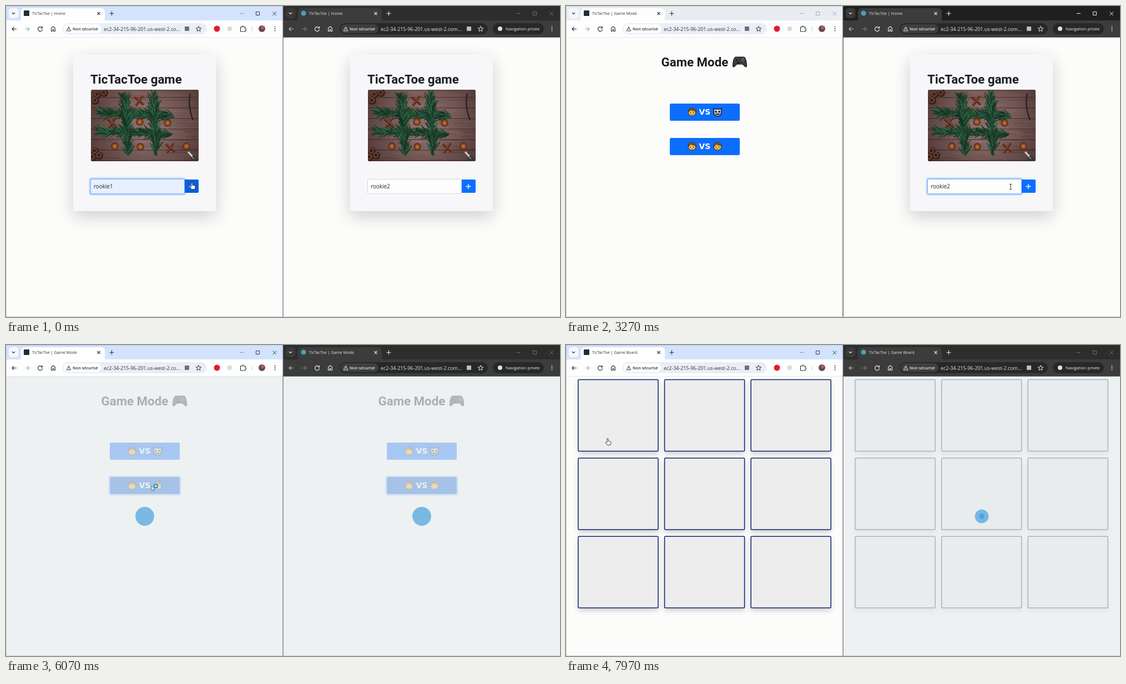
These frames come from a looping animation (998 px wide and 561 px high, 8 s). An HTML page with a canvas:

```html
<!DOCTYPE html>
<html lang="fr">
<head>
<meta charset="utf-8">
<title>TicTacToe</title>
<style>
html, body { margin: 0; width: 100%; height: 100%; overflow: hidden; background: #fcfcfb; }
canvas { display: block; width: 998px; height: 561px; }
</style>
</head>
<body>
<canvas id="stage" width="998" height="561"></canvas>
<script>
const LOOP = 8000, HALF = 499;
const UI = '"Open Sans", "Noto Sans", sans-serif';
const HEADING = 'bold 22.3px Roboto, sans-serif';
const BLUE = '#0d6efd', DARK_BLUE = '#0b5ed7';
let c = document.getElementById('stage').getContext('2d');
const screenContext = c;

// Times of the clicks and page changes
const LEFT = { click: 200, mode: 450, hover: 5740, load: 6045, board: 7310, loadEnd: 7310 };
const RIGHT = { hoverAdd: 3460, click: 3600, mode: 4250, hover: 4680, load: 5005, board: 7310, loadEnd: LOOP };
const FOCUS_RIGHT = 1500, FOCUS_LEFT = 5950;

// ---------- drawing helpers ----------
function box(x, y, w, h, r, fill, stroke, lineWidth = 1) {
  c.beginPath();
  c.roundRect(x, y, w, h, r);
  if (fill) { c.fillStyle = fill; c.fill(); }
  if (stroke) { c.strokeStyle = stroke; c.lineWidth = lineWidth; c.stroke(); }
}
function disc(x, y, r, fill, stroke, lineWidth = 1) {
  c.beginPath();
  c.arc(x, y, r, 0, 7);
  if (fill) { c.fillStyle = fill; c.fill(); }
  if (stroke) { c.strokeStyle = stroke; c.lineWidth = lineWidth; c.stroke(); }
}
function path(d, stroke, lineWidth = 1, fill) {
  const p = new Path2D(d);
  if (fill) { c.fillStyle = fill; c.fill(p); }
  if (stroke) { c.strokeStyle = stroke; c.lineWidth = lineWidth; c.stroke(p); }
}
function text(s, x, y, font, color) {
  c.font = font;
  c.fillStyle = color;
  c.fillText(s, x, y);
}
function at(x, y, draw) {
  c.save();
  c.translate(x, y);
  draw();
  c.restore();
}
function withShadow(color, blur, dy, draw) {
  c.save();
  c.shadowColor = color;
  c.shadowBlur = blur;
  c.shadowOffsetY = dy;
  draw();
  c.restore();
}
function seeded(seed) {
  return () => (seed = seed * 16807 % 2147483647) / 2147483647;
}

// ---------- picture on the home card ----------
function makePhoto() {
  const canvas = document.createElement('canvas');
  canvas.width = 194;
  canvas.height = 129;
  c = canvas.getContext('2d');
  const rnd = seeded(77);
  c.fillStyle = '#876a66';
  c.fillRect(0, 0, 194, 129);
  for (let i = 0; i < 160; i++) {
    const x = rnd() * 194 - 20, y = rnd() * 129;
    path(`M${x} ${y}h${15 + rnd() * 40}`, i % 2 ? '#a98a8455' : '#57393555', 1);
  }
  for (let y = 14; y < 129; y += 19) path(`M0 ${y}H194`, '#4b3230', 1);
  const vignette = c.createRadialGradient(100, 60, 30, 100, 60, 120);
  vignette.addColorStop(0, 'rgba(40,18,18,0)');
  vignette.addColorStop(1, 'rgba(40,18,18,.6)');
  c.fillStyle = vignette;
  c.fillRect(0, 0, 194, 129);

  // A bushy branch: needles fan forward from a spine
  function branch(x0, y0, x1, y1) {
    const angle = Math.atan2(y1 - y0, x1 - x0);
    const greens = ['#15301f', '#1f4a30', '#33694a', '#193a27'];
    for (let i = 0; i < 420; i++) {
      const k = rnd(), a = angle + (rnd() - .5) * 1.5, len = 8 + rnd() * 11;
      const x = x0 + (x1 - x0) * k + (rnd() - .5) * 6, y = y0 + (y1 - y0) * k + (rnd() - .5) * 6;
      path(`M${x} ${y}l${Math.cos(a) * len} ${Math.sin(a) * len}`, greens[i % 4], 1.2);
    }
  }
  branch(150, 47, 22, 42);
  branch(146, 80, 20, 75);
  branch(67, 118, 62, 18);
  branch(117, 118, 113, 14);
  for (const [x, y] of [[88, 58], [138, 60], [43, 102], [89, 103], [172, 102]]) {
    disc(x, y, 6, '#8c4a25', '#52291b', 1.5);
    disc(x, y, 2.8, '#b06a38');
  }
  for (const [x, y] of [[87, 20], [38, 60], [143, 105]]) {
    path(`M${x - 8} ${y - 7}l16 14M${x + 6} ${y - 9}l-12 18`, '#431f15', 4);
    path(`M${x - 8} ${y - 8}l16 14M${x + 6} ${y - 10}l-12 18`, '#944a2c', 1.5);
  }
  for (const [x, y] of [[12, 9], [24, 6], [8, 20], [7, 111], [15, 119], [3, 122]]) {
    disc(x, y, 7, '#3a211b');
    disc(x - 1, y - 1, 4, null, '#84533c', 1.5);
  }
  path('M179 7Q174 30 184 55', '#2a2323', 2.5);
  path('M175 112l11 12', '#d0d3d6', 3);
  path('M183 120l9 6M180 123l8 6', '#35353a', 3);
  c = screenContext;
  return canvas;
}
const photo = makePhoto();

// ---------- emoji ----------
function face(x, y) {
  at(x, y, () => {
    disc(0, .5, 6.8, '#fcc353', '#33230f', 1);
    path('M-7 1C-8-9 8-10 7 1L5-2Q0-1-2-4Q-4-1-7 1Z', '#33230f', .8, '#8a5523');
    disc(-2.6, 1.5, .9, '#332211');
    disc(2.6, 1.5, .9, '#332211');
    path('M-2 4.5Q0 5.5 2 4.5', '#6b3d13', .8);
  });
}
function robot(x, y) {
  at(x, y, () => {
    path('M-7-6l3 1h8l3-1l0 8Q5 8 0 8Q-5 8-7 2Z', '#1c1f24', 1.5, '#b9bfc4');
    box(-4.5, -4, 9, 3.5, 1, '#f1f3f4');
    disc(-3, -.5, 1.9, '#2b3138');
    disc(3, -.5, 1.9, '#2b3138');
    box(-3.4, 3, 6.8, 2.6, 1, '#2b3138');
  });
}
function gamepad(x, y) {
  at(x, y, () => {
    path('M-8-9H8C11-8 13 3 12.500 8C11 11 8 7 5 4H-5C-8 7-11 11-12.500 8C-13 3-11-8-8-9Z', '#111', 1, '#3b3b3d');
    disc(-6, -3, 2.6, '#17181a', '#77797c', .7);
    disc(3, 1, 2, '#17181a', '#77797c', .7);
    disc(-3, 1, 2, '#17181a');
    for (const [dx, dy, col] of [[6, -6, '#c9b13b'], [8, -4, '#b84a43'], [4, -4, '#477fb8'], [6, -2, '#54a05b']]) disc(dx, dy, 1, col);
  });
}

// ---------- pages, in left-window coordinates ----------
function glow(x, y, w, h) {
  box(x - 1.5, y - 1.5, w + 3, h + 3, 3, null, 'rgba(13,110,253,.28)', 3);
}
function home(name, inputFocus, autofill, addHot, addFocus) {
  withShadow('rgba(0,0,0,.18)', 30, 10, () => box(121, 88, 257, 282, 3, '#f7f7fa'));
  text('TicTacToe game', 152, 140, HEADING, '#1b1e21');
  c.save();
  c.beginPath();
  c.roundRect(153, 151, 194, 129, 2.5);
  c.clip();
  c.drawImage(photo, 153, 151);
  c.restore();
  box(321, 313, 26, 24, [0, 2, 2, 0], addHot ? DARK_BLUE : BLUE);
  path('M329.500 325.500h9M334 321v9', '#fff', 1.4);
  if (addFocus) glow(321, 313, 26, 24);
  if (inputFocus) glow(152.5, 312.5, 169, 26);
  box(152.5, 312.5, 169, 26, 1, autofill ? '#e8f0fe' : '#fdfdfd', inputFocus ? '#86b7fe' : '#d3d7dc');
  text(name, 158, 329, '9.9px ' + UI, '#25292d');
}
function modeButton(y, opponent, hot, focused) {
  if (focused) glow(187, y, 126, 31);
  box(187, y, 126, 31, 2.5, hot ? DARK_BLUE : BLUE);
  face(227, y + 15);
  text('VS', 239.5, y + 20, 'bold 14px "DejaVu Sans", sans-serif', '#fff');
  opponent(273, y + 15);
}
function gameMode(hot, focused) {
  text('Game Mode', 171.5, 109, HEADING, '#1b1e21');
  gamepad(313, 101);
  modeButton(176, robot);
  modeButton(238, face, hot, focused);
}
function board() {
  for (let i = 0; i < 9; i++) {
    const x = 22 + i % 3 * 155.6, y = 62.5 + Math.floor(i / 3) * 141.4;
    withShadow('rgba(0,0,0,.18)', 10, 5, () => box(x, y, 144, 129, 1.5, '#ededed'));
    box(x, y, 144, 129, 1.5, null, '#0d2472', 1.5);
  }
}
function easeInOut(p) {
  return p < .5 ? 2 * p * p : 1 - 2 * (1 - p) * (1 - p);
}
function loader(age) {
  c.fillStyle = 'rgba(233,237,238,.7)';
  c.fillRect(0, 56, HALF, 505);
  const phase = age / 1050 % 2;
  const s = easeInOut(phase < 1 ? phase : 2 - phase);
  for (const k of [s, 1 - s]) disc(250, 309, 17 * k, 'rgba(42,150,220,.6)');
}
function page(t, state, isLeft) {
  c.fillStyle = '#fcfcfb';
  c.fillRect(0, 56, HALF, 505);
  if (t < state.mode) {
    const clicked = t >= state.click;
    if (isLeft) home('rookie1', !clicked, true, true, clicked);
    else home('rookie2', t >= FOCUS_RIGHT && !clicked, false, t >= state.hoverAdd, clicked);
  } else if (t < state.board) {
    gameMode(t >= state.hover, t >= state.load);
  } else {
    board();
  }
  if (t >= state.load && t < state.loadEnd) loader(t - (t < state.board ? state.load : state.board));
}

// ---------- browser frame ----------
function star(x, y, color) {
  let d = '';
  for (let i = 0; i < 10; i++) {
    const r = i % 2 ? 2.2 : 5, a = i * Math.PI / 5 - Math.PI / 2;
    d += `${i ? 'L' : 'M'}${x + r * Math.cos(a)} ${y + r * Math.sin(a)}`;
  }
  path(d + 'Z', color, 1);
}
function browser(title, active, dark) {
  const ink = dark ? '#e6e6e6' : '#30343a';
  const bar = dark ? '#3c3c3c' : '#fefefe';
  const pill = dark ? '#282828' : '#e9eef7';
  const strip = dark ? (active ? '#1e1f1f' : '#2d2d2d') : (active ? '#d3e3fd' : '#e9edf3');
  const faint = dark ? '#777' : '#a7abb0';
  c.fillStyle = strip;
  c.fillRect(0, 0, HALF, 27);
  c.fillStyle = bar;
  c.fillRect(0, 26, HALF, 30);
  c.fillStyle = dark ? '#4b4b4b' : '#e2e4e8';
  c.fillRect(0, 56, HALF, .8);

  box(5, 4, 17.5, 18, 5, dark ? '#3a3a3a' : '#f4f8fe');
  path('M11 12l2.500 2.500l2.500-2.500', ink, 1.2);
  box(27, 4, 151, 24, [6, 6, 0, 0], bar);
  if (dark) disc(37, 13, 4.6, '#4b9fb8');
  else box(32, 8, 10, 10, 1, '#1f2f38');
  text(title, 47, 16, '7.2px ' + UI, ink);
  path('M164.500 11l5 5m0-5l-5 5', ink, 1.1);
  path('M186.500 13.500h8M190.500 9.500v8', ink, 1.1);
  const control = dark ? (active ? '#eee' : '#707070') : (active ? '#33373d' : '#a5a8ad');
  path('M421 13.500h7', dark || !active ? control : '#8d949e', 1);
  path('M450.500 10.500h6v6h-6ZM480.500 10.500l6.500 6.500m0-6.500l-6.500 6.500', control, 1);

  path('M19 41.500h-8m3.500-3.500l-3.500 3.500l3.500 3.500', dark ? '#b5b5b5' : ink, 1.2);
  path('M34 41.500h8m-3.500-3.500l3.500 3.500l-3.500 3.500', faint, 1.2);
  path('M64.500 39A4 4 0 1 0 65.500 42M65.500 37v3h-3', ink, 1.2);
  path('M81.500 45.500V40l3.500-3l3.500 3v5.500h-2.500v-3h-2v3Z', ink, 1.1);

  box(102, 31, dark ? 267 : 260, 20, 10, pill);
  box(104, 33, 67.5, 16, 8, dark ? '#3e3e3e' : '#fdfdfe');
  path('M113 37.500l4 7.500h-8ZM113 40v2.300M113 43v1', ink, .9);
  text('Non sécurisé', 120, 44, '600 7.3px ' + UI, ink);
  text(dark ? 'ec2-34-215-96-201.us-west-2.com…' : 'ec2-34-215-96-201.us-west-2.co…', 176, 44.6, '8.9px ' + UI, ink);
  const shift = dark ? 9 : 0;
  box(322 + shift, 37, 8, 8, 1, dark ? '#bdbdbd' : '#69717c');
  star(347 + shift, 41.5, ink);
  if (dark) {
    box(378, 31, 92, 20, 10, pill);
    disc(391, 41, 4, '#e2e2e2');
    text('Navigation privée', 401, 43.8, '7.5px ' + UI, '#eee');
  } else {
    disc(380, 41, 5.5, '#e01b2d');
    disc(403, 41, 4.5, '#dddeda');
    path('M422.500 38h2.500a1.700 1.700 0 0 1 3.400 0h2.600v3a1.500 1.500 0 0 1 0 3v2h-8.500Z', ink, 1.2);
    path('M443.500 37v9', '#c6d8f5', 1);
    disc(461, 41, 6, '#6d4650');
    disc(462, 39, 3, '#a5606c');
  }
  for (const y of [37.5, 41, 44.5]) disc(484.5, y, .95, ink);
}

// ---------- pointer ----------
const route = [
  [0, 335, 319], [420, 335, 319], [1230, 682, 341], [1450, 690, 326], [2550, 690, 326],
  [3270, 801, 326], [3500, 834, 322], [4150, 834, 322], [4600, 777, 261], [5020, 777, 261],
  [5300, 500, 191], [5750, 262, 254], [6060, 262, 254], [6570, 183, 207], [7310, 170, 200],
  [7900, 75, 169], [LOOP, 75, 169]
];
function pointerAt(t) {
  const i = route.findIndex(p => p[0] > t);
  const [t0, x0, y0] = route[i - 1], [t1, x1, y1] = route[i];
  const k = easeInOut((t - t0) / (t1 - t0));
  return [x0 + (x1 - x0) * k, y0 + (y1 - y0) * k];
}
function pointerKind(t, px, y) {
  const state = px < HALF ? LEFT : RIGHT, x = px % HALF;
  const inside = (l, top, r, bottom) => x > l && x < r && y > top && y < bottom;
  const loading = t >= state.load && t < state.loadEnd;
  if (!loading) {
    if (t < state.mode) {
      if (inside(321, 313, 347, 337)) return 'hand';
      if (inside(152, 312, 321, 339)) return 'text';
    } else if (t < state.board) {
      if (inside(187, 176, 313, 207) || inside(187, 238, 313, 269)) return 'hand';
    } else if (inside(22, 62, 166, 192)) return 'hand';
  }
  return t > RIGHT.load ? 'busy' : 'arrow';
}
function pointer(t) {
  const [x, y] = pointerAt(t), kind = pointerKind(t, x, y);
  at(x, y, () => {
    if (kind === 'hand') {
      path('M-1 0Q0-1 1 0V4L5 5Q6.500 5.500 6 8L5 11.500H-.5L-4 7Q-4 5.500-1 7Z', '#333', .9, '#fff');
    } else if (kind === 'text') {
      path('M-2-4.500h4M0-4.500v9M-2 4.500h4', '#333', 1);
    } else {
      path('M0 0V8.500L2 6.700L3.500 9.800L4.800 9.200L3.500 6.200H6Z', '#555', .8, '#fff');
      if (kind === 'busy') disc(8, .5, 3, '#d9f0fc', '#168bd6', 2);
    }
  });
}

function frame(now) {
  const t = now % LOOP;
  const rightActive = t >= FOCUS_RIGHT && t < FOCUS_LEFT;
  const title = s => 'TicTacToe | ' + (t < s.mode ? 'Home' : t < s.board ? 'Game Mode' : 'Game Board');
  [LEFT, RIGHT].forEach((state, i) => at(i * HALF, 0, () => {
    c.beginPath();
    c.rect(0, 0, HALF, 561);
    c.clip();
    page(t, state, i === 0);
    browser(title(state), i ? rightActive : !rightActive, i === 1);
  }));
  c.fillStyle = rightActive ? '#4c4d48' : '#707276';
  c.fillRect(498.4, 0, 1.3, 561);
  c.fillStyle = '#b5bfcb';
  c.fillRect(0, 0, HALF, .6);
  c.fillRect(0, 0, .7, 561);
  c.fillRect(0, 560.3, 998, .7);
  pointer(t);
  requestAnimationFrame(frame);
}
requestAnimationFrame(frame);
</script>
</body>
</html>
```
